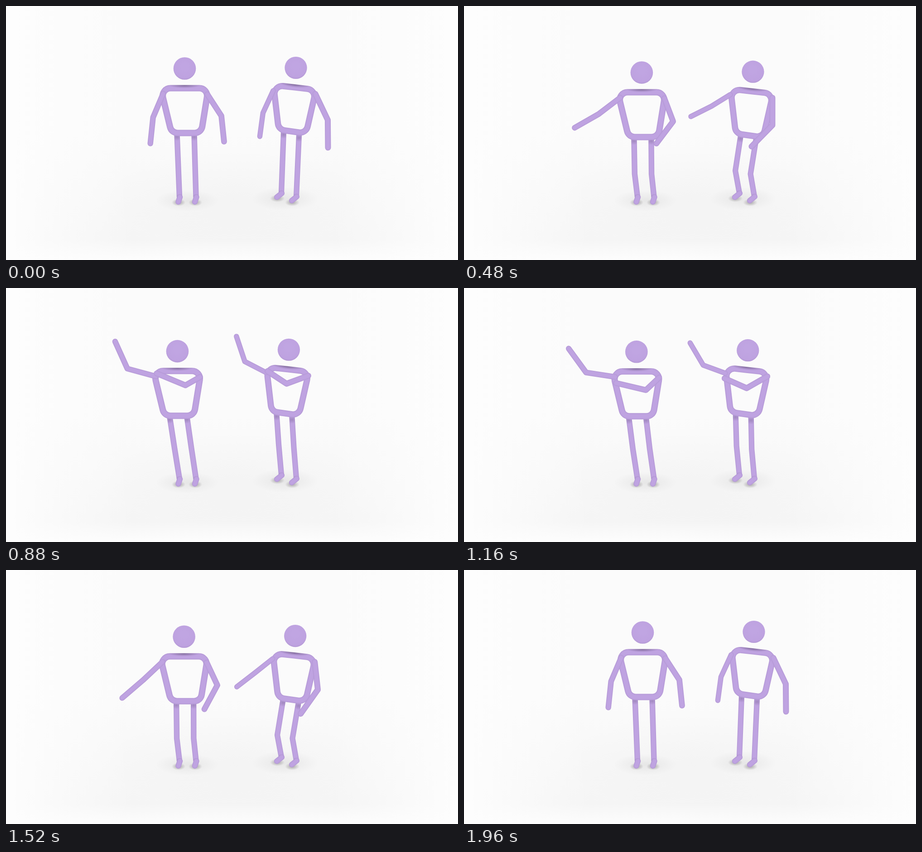
An HTML page with a canvas that plays this animation: 998 by 561 pixels, repeating every 2.48 s.

```html
<!DOCTYPE html>
<html lang="en">
<head>
<meta charset="utf-8">
<title>Two figures waving</title>
<style>
html, body { margin: 0; width: 100%; height: 100%; overflow: hidden; background: #fcfcfc; }
canvas {
  display: block; width: 998px; height: 561px;
  background:
    radial-gradient(15px 8px at 381px 434px, rgba(70,64,68,.42), transparent),
    radial-gradient(15px 8px at 418px 434px, rgba(70,64,68,.42), transparent),
    radial-gradient(16px 8px at 599px 425px, rgba(70,64,68,.4), transparent),
    radial-gradient(16px 8px at 632px 434px, rgba(70,64,68,.4), transparent),
    radial-gradient(70px 24px at 400px 430px, rgba(60,60,60,.08), transparent),
    radial-gradient(74px 26px at 616px 426px, rgba(60,60,60,.08), transparent),
    radial-gradient(300px 110px at 505px 425px, rgba(90,90,90,.025), transparent),
    linear-gradient(90deg, #fdfdfd, rgba(253,253,253,0) 28%, rgba(253,253,253,0) 72%, #fdfdfd),
    linear-gradient(#fbfbfb, #fbfbfb 50%, #f8f8f8 72%, #f5f5f5 92%, #fafafa 97%, #fdfdfd);
}
</style>
</head>
<body>
<canvas id="stage" width="998" height="561"></canvas>
<script>
const ctx = document.getElementById('stage').getContext('2d');
const STEP = 40, LOOP = 2480, LAST = 49;
const CROUCH_DEPTH = 9.3;

// A limb turns from one angle (degrees from straight down) to another,
// while perspective changes its length; swell peaks midway.
const limb = (from, to, length, endLength, swell = 0) => ({ from, to, length, endLength, swell });

const figures = [
  {
    head: [394.5, 138], radius: 24.8,
    torso: [[341.5, 181.5], [447, 181.5], [431, 280.5], [365.5, 280.5]],
    tube: 14, leg: 12.4,
    sway: [-17, 1.2],
    hip: [377.5, 283], hipGap: [38, 0],
    ankle: [383, 421], ankleGap: [36.5, 0],
    knee: [-2.5, 15.5], toe: [-2.5, 11.5],
    arms: [
      { shoulder: [347, 193.5], width: 12.4, lag: 1,
        upper: limb(23, 107.5, 57, 65.5), fore: limb(6, 160, 58, 66) },
      { shoulder: [444.5, 195], width: 12.7, lag: 2,
        upper: limb(-33, 66, 57, 36), fore: limb(-6, 116, 57, 69) }
    ]
  },
  {
    head: [640, 136.5], radius: 24.6,
    torso: [[590.5, 174.5], [684.5, 185], [662.5, 281.5], [602, 273]],
    tube: 13.6, leg: 12.2,
    sway: [-16.5, -.8],
    hip: [613, 278], hipGap: [34, 7],
    ankle: [608, 412.5], ankleGap: [33, 7.5],
    knee: [-11, 15], toe: [-10, 9.8],
    arms: [
      { shoulder: [590, 187], width: 11.4, lag: 1,
        upper: limb(24.7, 120, 54, 53.6, -6), fore: limb(7.7, 166, 52.5, 59, -4) },
      { shoulder: [683, 194], width: 13, lag: 1.3,
        upper: limb(-25.4, 73.4, 64, 50.6), fore: limb(-.5, 127, 61, 49, 10) }
    ]
  }
];

const mix = (a, b, k) => a + (b - a) * k;
const add = (p, q, k = 1) => [p[0] + q[0] * k, p[1] + q[1] * k];
const middle = (p, q) => [mix(p[0], q[0], .5), mix(p[1], q[1], .5)];

function smooth(from, to, u) {
  const x = Math.min(1, Math.max(0, (u - from) / (to - from)));
  return x * x * (3 - 2 * x);
}

function reach(start, part, k) {
  const angle = mix(part.from, part.to, k) * Math.PI / 180;
  const length = mix(part.length, part.endLength, k) + part.swell * Math.sin(Math.PI * k);
  return add(start, [-Math.sin(angle), Math.cos(angle)], length);
}

// Strokes the path as a softly shaded tube.
function tube(path, width) {
  for (const [scale, color] of [[1, '#b499d5'], [.86, '#bb9fdd'], [.62, '#bfa3e1']]) {
    ctx.lineWidth = width * scale;
    ctx.strokeStyle = color;
    ctx.stroke(path);
  }
}

function line(points, width) {
  const path = new Path2D();
  points.forEach(p => path.lineTo(...p));
  tube(path, width);
}

function ring(points, radius) {
  const path = new Path2D(), n = points.length;
  path.moveTo(...middle(points[0], points[1]));
  for (let i = 1; i <= n; i++) path.arcTo(...points[i % n], ...points[(i + 1) % n], radius);
  path.closePath();
  return path;
}

// Contact shade that only darkens what is already painted.
function shade([x, y], rx, ry, turn, alpha) {
  ctx.save();
  ctx.globalCompositeOperation = 'source-atop';
  ctx.translate(x, y);
  ctx.rotate(turn);
  ctx.scale(rx, ry);
  const g = ctx.createRadialGradient(0, 0, 0, 0, 0, 1);
  g.addColorStop(0, `rgba(70,54,88,${alpha})`);
  g.addColorStop(1, 'rgba(70,54,88,0)');
  ctx.fillStyle = g;
  ctx.fillRect(-1, -1, 2, 2);
  ctx.restore();
}

function ball([x, y], r) {
  const g = ctx.createRadialGradient(x, y - 5, r * .3, x, y - 2, r * 1.1);
  g.addColorStop(0, '#c0a5e2');
  g.addColorStop(.8, '#bea2e0');
  g.addColorStop(1, '#b398d4');
  ctx.fillStyle = g;
  ctx.beginPath();
  ctx.arc(x, y, r, 0, 2 * Math.PI);
  ctx.fill();
}

function drawLeg(fig, hip, ankle, crouch) {
  const knee = add(middle(hip, ankle), fig.knee, crouch);
  line([hip, knee, ankle], fig.leg);
  shade(add(hip, [0, 6]), 10, 9, 0, .25);
  shade(ankle, 8, 6, 0, .3);
  line([add(ankle, [1, 1]), add(ankle, fig.toe)], fig.leg);
}

function drawArm(arm, shift, swing) {
  const shoulder = add(arm.shoulder, shift);
  const elbow = reach(shoulder, arm.upper, swing ** arm.lag);
  line([shoulder, elbow, reach(elbow, arm.fore, swing)], arm.width);
}

function drawFigure(fig, u) {
  const crouch = smooth(0, 10, u) - smooth(10, 24, u);
  const swing = smooth(4, 24, u);
  const shift = add([0, CROUCH_DEPTH * crouch], fig.sway, swing ** 2);

  const hip = add(fig.hip, shift);
  drawLeg(fig, hip, fig.ankle, crouch);
  drawLeg(fig, add(hip, fig.hipGap), add(fig.ankle, fig.ankleGap), crouch);

  const torso = fig.torso.map(p => add(p, shift));
  const [left, right] = torso;
  tube(ring(torso, 17), fig.tube);
  const tilt = Math.atan2(right[1] - left[1], right[0] - left[0]);
  shade(add(middle(left, right), [0, -6]), 34, 6, tilt, .45);

  fig.arms.forEach(arm => drawArm(arm, shift, swing));
  ball(add(fig.head, shift), fig.radius);
}

// The second half of the motion mirrors the first, then rests.
const start = performance.now();
function frame() {
  const time = (performance.now() - start) % LOOP;
  const step = Math.min(LAST, Math.floor(time / STEP));
  ctx.clearRect(0, 0, 998, 561);
  ctx.lineCap = ctx.lineJoin = 'round';
  for (const fig of figures) drawFigure(fig, Math.min(step, LAST - step));
  requestAnimationFrame(frame);
}
frame();
</script>
</body>
</html>
```
